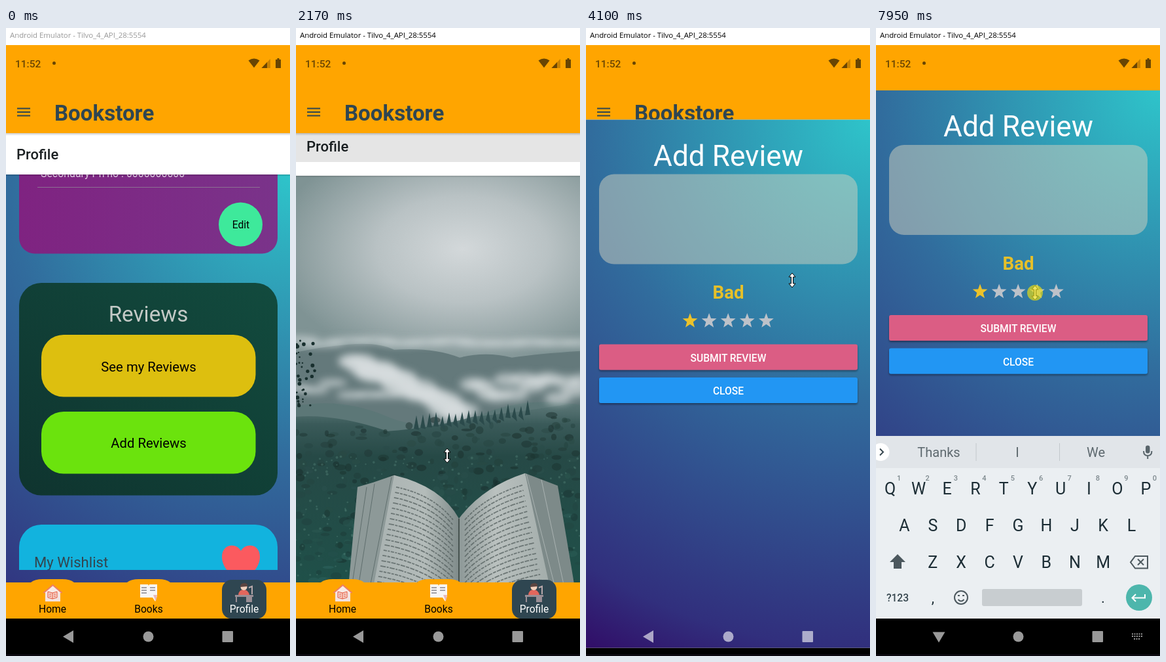
Recreate the animation shown at these times as an HTML page. Size 434 by 956 pixels, loop 8000 ms.

```html
<!DOCTYPE html>
<html lang="en">
<head>
<meta charset="utf-8">
<title>Bookstore app</title>
<style>
  html, body { margin: 0; height: 100%; overflow: hidden; background: #fff; }
  svg { display: block; width: 100vw; height: 100vh; font: 15.6px Roboto, sans-serif; }
  .mid { text-anchor: middle; }
  .med { font-weight: 500; }
  .bold { font-weight: 700; }
  .h2 { font-size: 22px; font-weight: 500; fill: #1b2022; }
  .line { fill: none; stroke-width: 2; }
</style>
</head>
<body>
<svg viewBox="0 0 434 956" preserveAspectRatio="none">
  <defs>
    <radialGradient id="sea" gradientUnits="userSpaceOnUse" cx="434" cy="0" r="914">
      <stop stop-color="#2ec4ca"/><stop offset=".47" stop-color="#316c9d"/>
      <stop offset=".88" stop-color="#312f7d"/><stop offset="1" stop-color="#310d67"/>
    </radialGradient>
    <radialGradient id="sky" gradientUnits="userSpaceOnUse" cx="255" cy="335" r="290" gradientTransform="matrix(1 0 0 .62 0 127)">
      <stop stop-color="#d3d8da"/><stop offset=".45" stop-color="#b9c2c4"/><stop offset="1" stop-color="#7f9394"/>
    </radialGradient>
    <linearGradient id="forest" x2="0" y2="1">
      <stop stop-color="#47656500"/><stop offset=".12" stop-color="#3a5a59"/><stop offset=".3" stop-color="#264946"/><stop offset="1" stop-color="#1f5049"/>
    </linearGradient>
    <linearGradient id="pageL"><stop stop-color="#a9b2b1"/><stop offset=".6" stop-color="#b4bcba"/><stop offset="1" stop-color="#7f8b8a"/></linearGradient>
    <linearGradient id="pageR"><stop stop-color="#8d9897"/><stop offset=".4" stop-color="#bac1bf"/><stop offset="1" stop-color="#a3adab"/></linearGradient>
    <linearGradient id="dusk" x1="0" y1="1" x2="1" y2="0"><stop stop-color="#0f342f"/><stop offset="1" stop-color="#124b3e"/></linearGradient>
    <linearGradient id="plum"><stop stop-color="#7f2381"/><stop offset="1" stop-color="#7a338a"/></linearGradient>
    <linearGradient id="shade" x2="0" y2="1"><stop stop-opacity=".2"/><stop offset="1" stop-opacity="0"/></linearGradient>
    <filter id="blur" x="-20%" y="-50%" width="140%" height="200%"><feGaussianBlur stdDeviation="6"/></filter>
    <filter id="drop" x="-5%" y="-20%" width="110%" height="160%"><feDropShadow dx="0" dy="2" stdDeviation="1.5" flood-opacity=".4"/></filter>
    <clipPath id="screen"><path d="M0 160H434V844H0z"/></clipPath>
    <clipPath id="scroll"><path d="M0 223H434V825H0z"/></clipPath>
    <clipPath id="reveal"><rect id="revealBox" width="434" height="684"/></clipPath>
    <clipPath id="photoBox"><path d="M0 223H434V844H0z"/></clipPath>
  </defs>

  <rect width="434" height="956" fill="#fff"/>
  <text id="caption" x="6" y="15" font-size="11.5" style="font-family:'Open Sans',sans-serif" letter-spacing="-.1">Android Emulator - Tilvo_4_API_28:5554</text>

  <g clip-path="url(#screen)">
    <!-- profile page -->
    <g id="profile">
      <rect y="160" width="434" height="700" fill="#fff"/>
      <text class="h2" x="16" y="200">Profile</text>
      <rect width="434" height="640" fill="url(#sea)" transform="translate(0 223)"/>
      <g clip-path="url(#scroll)">
        <rect x="20" y="150" width="395" height="193.500" rx="24" fill="url(#plum)"/>
        <text x="53" y="227" font-size="15.9" fill="#e6d3e8">Secondary Ph no : 0000000000</text>
        <path d="M48 242.500H388" stroke="#8c6f92"/>
        <circle cx="358.500" cy="299" r="33.500" fill="#3ee99b"/>
        <text class="mid" x="359" y="305">Edit</text>
        <rect x="20" y="388" width="395" height="323.500" rx="34" fill="url(#dusk)"/>
        <text class="mid" x="217.500" y="446.500" font-size="33.200" fill="#c3c9c6">Reviews</text>
        <rect x="54" y="467" width="327.500" height="94.500" rx="34" fill="#ddbf0f"/>
        <rect x="54" y="584" width="327.500" height="94.500" rx="34" fill="#6be30d"/>
        <g class="mid" font-size="20.300">
          <text x="218" y="523">See my Reviews</text><text x="218" y="639">Add Reviews</text>
        </g>
        <rect x="20" y="756" width="395" height="150" rx="34" fill="#12b3de"/>
        <text x="43" y="821" font-size="22.100" fill="#33454f">My Wishlist</text>
        <path d="M359 846C345 834 330 822 330 805C330 785 352 783 359 796C366 783 388 785 388 805C388 822 373 834 359 846z" fill="#fb5a5f"/>
      </g>
      <rect y="223" width="434" height="3" fill="url(#shade)"/>
    </g>
    <rect id="dim" y="160" width="434" height="684"/>

    <!-- add-review page -->
    <g clip-path="url(#reveal)"><g id="addPage">
      <rect y="160" width="434" height="64" fill="#fff"/>
      <path class="line" stroke="#1b2022" d="M36 191.500H20M27.500 183.500L19.500 191.500L27.500 199.500"/>
      <text class="h2" x="74" y="200">Add Review</text>
      <g clip-path="url(#photoBox)">
        <rect y="223" width="434" height="400" fill="url(#sky)"/>
        <path d="M0 492Q35 484 80 480T150 488Q210 484 250 500Q290 490 330 500Q370 494 434 490V640H0z" fill="#64797b"/>
        <path d="M0 574Q70 560 140 590T300 580Q360 560 434 572V660H0z" fill="#5c7777"/>
        <g id="fog" fill="#d8dedf" filter="url(#blur)"></g>
        <path d="M0 590Q60 585 140 612Q215 606 270 590Q330 585 434 568V844H0z" fill="url(#forest)"/>
        <g id="trees"></g>
        <path d="M94 697L118 690L150 679L249 745L240 850H80z" fill="#8d9998"/>
        <path d="M120 692L96 844M108 697L86 844M146 682L114 844" stroke="#5f6e6d" fill="none"/>
        <path d="M150 679Q222 696 249 745V850H118z" fill="url(#pageL)"/>
        <path d="M350 676L400 695L426 850H370z" fill="#7d8a89"/>
        <path d="M352 677L396 850M375 686L410 850" stroke="#a9b2b1" fill="none"/>
        <path d="M249 745Q285 697 350 676L388 850H249z" fill="url(#pageR)"/>
        <path d="M249 745V844" stroke="#46524f" stroke-width="2"/>
        <g id="print" fill="none" stroke="#566160" stroke-width="1.800" opacity=".75"></g>
      </g>
      <g id="card">
        <rect x="20" y="245" width="395" height="179" rx="23" fill="#14705f" fill-opacity=".93" filter="url(#drop)"/>
        <rect x="43" y="267" width="78" height="135" fill="#3f4c5d"/>
        <path d="M43 360L85 357L121 364V402H43z" fill="#a9c0ca"/>
        <path d="M43 358Q85 347 121 352V364Q85 358 43 368z" fill="#8fa5b0"/>
        <circle cx="96" cy="285.500" r="4.500" fill="#dfe3e6"/>
        <path d="M43 330Q62 340 55 372M55 345Q75 333 84 334M121 318Q104 326 108 360M108 336Q96 326 84 328M43 276Q75 268 90 275M43 287Q60 276 76 284" stroke="#67606d" stroke-width="3" fill="none"/>
        <path d="M52 316l5-11 4 11 5-10 3 10q8-16 8 0l6-11 3 11 6-12M95 316v-13l5 12 4-13 5 10" stroke="#eef0f2" stroke-width="2" fill="none"/>
        <path d="M66 298H100" stroke="#cdd3d8" stroke-dasharray="3 1.500"/>
        <path d="M53 386l4-11 5 11zM63 387l3-11 5 11zM76 386l4-10 4 10z" fill="#4b4a55"/>
        <g font-size="15.700" fill="#fff">
          <text x="159.500" y="285">Book name : Moyurider Nodi</text>
          <text x="159.500" y="306.500">Author name :</text>
          <text x="159.500" y="328">Review Already given : Yes</text>
        </g>
        <g id="addButton">
          <rect x="275" y="355" width="106" height="46" rx="23" fill="#6f9640" stroke="#a3523f"/>
          <text class="mid" x="328" y="384" fill="#435f25">Add Review</text>
        </g>
      </g>
      <rect y="223" width="434" height="3" fill="url(#shade)"/>
    </g></g>
    <rect y="160" width="434" height="4" fill="url(#shade)"/>
  </g>

  <!-- app bar -->
  <rect y="26" width="434" height="134" fill="#ffa500"/>
  <g fill="#684503">
    <text class="med" x="14" y="60" font-size="15.500">11:52</text>
    <circle cx="73.500" cy="53.500" r="2.500"/>
    <path d="M379 60.500L370.500 49.500Q379 43.500 387.500 49.500z"/>
    <path d="M390.500 61L404 47V61z" opacity=".35"/><path d="M390.500 61L399 52V61z"/>
    <path d="M412 48h2.500v-2h3v2h2.500v13h-8z"/>
  </g>
  <path class="line" stroke="#2f4651" d="M17 122.500H37M17 128H37M17 133.500H37"/>
  <text class="bold" x="74" y="141" font-size="33.100" fill="#2f4651">Bookstore</text>

  <!-- tabs -->
  <path d="M0 844H38Q44 839 56 839H86Q98 839 104 844H185Q191 839 203 839H233Q245 839 251 844H434V899H0z" fill="#ffa500"/>
  <rect x="330" y="840" width="68" height="59.500" rx="15" fill="#2f4651"/>
  <path d="M60 859H83V873H60z" fill="#f3e3e0"/>
  <path d="M57.500 860L71.500 848L85.500 860" fill="#f7ebe6" stroke="#ee7d63" stroke-width="2"/>
  <path d="M64 858l7 2 7-2v9l-7 2-7-2z" fill="#f6d2c8" stroke="#e4573d"/><path d="M71 860v9M66 862h3M66 865h3M73 862h3M73 865h3" stroke="#e4573d"/>
  <path d="M205 847h12l1 2 1-2h12v18l-3 8-4-6h-19z" fill="#f7f5f6"/>
  <path d="M207 852h8M207 856h8M207 860h8M220 852h8M220 856h8" stroke="#4f4c55"/>
  <path d="M225 863h6l-2 10z" fill="#eab9b6"/>
  <path d="M355 863q1-8 8-8t9 8z" fill="#e2665c"/><circle cx="363.500" cy="851" r="5" fill="#f3d1bd"/>
  <path d="M358 851q0-6 6-6t5 5z" fill="#5b4440"/>
  <path d="M350 863h28v3h-2v8h-9v-8h-14v8h-2v-8h-1z" fill="#9a8e95"/><path class="line" d="M371 852l5-2v12" stroke="#b9a9ac"/>
  <g class="mid">
    <text x="71" y="890">Home</text><text x="218" y="890">Books</text><text x="364" y="890" fill="#fff">Profile</text>
  </g>
  <rect y="899" width="434" height="54" fill="#000"/>

  <!-- review dialog -->
  <g id="dialog">
    <rect width="434" height="804" fill="#fff"/>
    <rect id="dialogBack" width="434" height="804" fill="url(#sea)"/>
    <text class="mid" x="217.500" y="70" font-size="44.200" fill="#fff">Add Review</text>
    <rect x="20" y="83" width="395" height="137" rx="23" fill="#d4d2bf" fill-opacity=".5"/>
    <rect id="caret" x="31.500" y="140" width="2" height="23" fill="#0fd0b8"/>
    <text class="mid bold" x="217.500" y="272.500" font-size="27.600" fill="#e6c029">Bad</text>
    <g id="stars"></g>
    <g filter="url(#drop)">
      <rect x="20" y="342" width="395" height="39" rx="3" fill="#db5d84"/>
      <rect x="20" y="392.500" width="395" height="39" rx="3" fill="#2196f3"/>
    </g>
    <g class="mid med" fill="#fff">
      <text x="217.500" y="368">SUBMIT REVIEW</text><text x="217.500" y="418.500">CLOSE</text>
    </g>
  </g>

  <!-- keyboard -->
  <g id="keyboard">
    <rect y="621" width="434" height="278" fill="#ebeff2"/>
    <rect y="621" width="434" height="49" fill="#e1e5e9"/>
    <circle cx="7" cy="645.500" r="13.500" fill="#fff"/>
    <path class="line" stroke="#37474f" d="M6 640.500l5 5-5 5"/>
    <path stroke="#c3c8cc" d="M153 632V659M280.500 632V659"/>
    <g class="mid" font-size="20" fill="#5d686e"><text x="96" y="653">Thanks</text><text x="216" y="653">I</text><text x="336" y="653">We</text></g>
    <rect x="412" y="635.500" width="6.500" height="12" rx="3.200" fill="#59656b"/>
    <path class="line" stroke="#59656b" d="M409 644q0 7 6.200 7t6.200-7M415.200 651v5"/>
    <g id="keys" class="mid" font-size="25" fill="#1c2d35"></g>
    <path d="M33 801l12 12h-6v10h-12v-10h-6z" fill="#4c585e"/>
    <path class="line" stroke="#4c585e" d="M396 804h19v18.500h-19l-7-9.200zM400 808.500l9 9M409 808.500l-9 9"/>
    <text class="mid med" x="33" y="873" fill="#37474f">?123</text>
    <g class="mid" font-size="22" fill="#1c2d35"><text x="87" y="875">,</text><text x="347" y="875">.</text></g>
    <circle class="line" cx="130" cy="867" r="10" stroke="#4c585e"/>
    <path class="line" stroke="#4c585e" d="M125.500 870q4.500 5 9 0M125 864h3M132 864h3"/>
    <rect x="162" y="854" width="153" height="26" rx="3" fill="#c8cdd0"/>
    <circle cx="402" cy="867" r="20" fill="#4db6ac"/>
    <path class="line" stroke="#fff" d="M411 862v5.500h-19M397 862l-5.500 5.500 5.500 5.500"/>
  </g>

  <!-- system buttons -->
  <g fill="#fff" opacity=".6">
    <path id="back" d="M87 926.500L103 917V936z"/>
    <circle cx="217.500" cy="926.500" r="8"/>
    <rect x="330.500" y="918" width="16.500" height="17" rx="1"/>
    <path id="imeIcon" d="M391 922.500H407M391 926H407M394 930H404" stroke="#fff" stroke-width="2" stroke-dasharray="2 1.500"/>
  </g>
  <rect y="953" width="434" height="3" fill="#0c0910"/>

  <g id="cursor">
    <path d="M0-11L5-5H1.500V5H5L0 11L-5 5H-1.500V-5H-5z" fill="#fff" stroke="#000"/>
    <circle id="press" r="12" fill="#e8dc12" fill-opacity=".68"/>
  </g>
</svg>
<script>
const $ = id => document.getElementById(id);
const set = (id, name, value) => $(id).setAttribute(name, value);
const show = (id, on) => set(id, 'visibility', on ? 'visible' : 'hidden');
const span = (t, start, length) => Math.min(1, Math.max(0, (t - start) / length));
const between = (t, a, b) => t >= a && t < b;
const repeat = (n, make) => Array.from({ length: n }, (_, i) => make(i)).join('');

let seed = 7;
const rand = () => (seed = seed * 16807 % 2147483647) / 2147483647;

// Fog: a thin band along the ridge, a bank sinking to the right, and one on the right slope.
const puff = (x, y, rx, ry) => `<ellipse cx="${x}" cy="${y}" rx="${rx}" ry="${ry}" opacity=".65"/>`;
$('fog').innerHTML = repeat(12, i => puff(i * 40, 472 + rand() * 8, 34, 5))
  + repeat(22, i => puff(85 + i * 8, 492 + i * 4 + rand() * 16, 16 + rand() * 18, 8 + rand() * 10))
  + repeat(14, i => puff(270 + i * 13, 530 + rand() * 32, 20, 10))
  + repeat(7, i => puff(i * 28, 535 + rand() * 24, 22, 6));

// Foliage: dark crowns on the slope, lighter leaves in front, a few firs and a twig.
$('trees').innerHTML = repeat(420, i => {
  const depth = i / 420, x = rand() * 434, y = 606 + depth * 240 + rand() * 12 - (1 - depth) * x * .06;
  return `<ellipse cx="${x}" cy="${y}" rx="${3 + rand() * 6}" ry="${2 + rand() * 4}"
    fill="hsl(${170 + rand() * 6} ${26 + depth * 14}% ${14 + rand() * (9 + depth * 8)}%)" opacity=".55"/>`;
}) + repeat(300, () => `<circle cx="${rand() * 434}" cy="${650 + rand() * 194}" r="${1 + rand()}" fill="#5d8d82" opacity=".35"/>`)
  + repeat(18, i => `<path d="M${180 + i * 10} ${608 - i * 1.2}l4-${14 + rand() * 9} 4 22z" fill="#2b4a4b"/>`)
  + repeat(34, () => `<circle cx="${rand() ** 2 * 32}" cy="${472 + rand() * 104}" r="${1 + rand() * 2}" fill="#182f2e"/>`);

// Lines of print, following the curve of each page.
$('print').innerHTML = repeat(19, i => {
  const y = 697 + i * 8, dash = `stroke-dasharray="${5 + i % 4} 1.500 ${3 + i % 3} 1.500"`, slant = i * 1.6;
  return `<path ${dash} d="M${153 - slant} ${y}Q${210 - slant / 2} ${y + 12} 240 ${y + 50}"/>
    <path ${dash} d="M258 ${y + 50}Q290 ${y + 14} ${346 + slant} ${y - 3}"/>`;
});

$('stars').innerHTML = repeat(5, i => {
  const points = repeat(10, k => {
    const r = k % 2 ? 5 : 12, a = k * Math.PI / 5;
    return `${159 + i * 29.1 + r * Math.sin(a)},${306.5 - r * Math.cos(a)} `;
  });
  return `<polygon points="${points}" fill="${i ? '#bdc2c9' : '#ecc22a'}"/>`;
});

$('keys').innerHTML = ['QWERTYUIOP', 'ASDFGHJKL', 'ZXCVBNM'].map((row, r) =>
  repeat(row.length, i => {
    const x = [21.7, 43.4, 86.8][r] + i * 43.4;
    const digit = r ? '' : `<text class="med" x="${x + 13.5}" y="689" font-size="11" fill="#7d888d">${(i + 1) % 10}</text>`;
    return `<text x="${x}" y="${710 + r * 56}">${row[i]}</text>${digit}`;
  })).join('');

// Pointer stops: time, x, y.
const path = [
  [330, 372, 879], [620, 288, 668], [850, 206, 597], [1100, 231, 651], [2380, 231, 651], [2740, 257, 494],
  [3150, 349, 379], [3480, 315, 384], [4430, 315, 384], [5200, 117, 247], [5900, 117, 247], [6120, 138, 231],
  [6420, 190, 183], [6900, 259, 416], [7300, 259, 417], [7680, 243, 403], [8000, 243, 403]
];
const clicks = [[1430, 1700], [3550, 3760], [5260, 5400], [7880, 8000]];

function pointerAt(t) {
  const i = Math.max(1, path.findIndex(stop => t < stop[0]));
  const [t0, x0, y0] = path[i - 1], [t1, x1, y1] = path[i];
  const k = span(t, t0, t1 - t0), e = k * k * (3 - 2 * k);
  return [x0 + (x1 - x0) * e, y0 + (y1 - y0) * e];
}

function draw() {
  const t = performance.now() % 8000;

  set('caption', 'fill', t < 1430 ? '#999' : '#000');

  const open = 1 - (1 - span(t, 1960, 425)) ** 4;
  set('profile', 'transform', `translate(0 ${-12.8 * open})`);
  set('dim', 'opacity', .11 * open);
  set('revealBox', 'y', 160 + 684 * (1 - open));
  set('addPage', 'transform', `translate(0 ${28 * (1 - open)})`);
  show('card', t >= 2450);
  set('addButton', 'opacity', 1 - .2 * span(t, 3620, 120));

  const rise = (1 - span(t, 3938, 211)) ** 2;
  set('dialog', 'transform', `translate(0 ${95 + 861 * rise})`);
  set('dialogBack', 'height', t < 5480 ? 804 : 526);
  show('caret', t >= 5400 && (t - 5400) % 1000 < 500);

  const typing = t >= 5440;
  set('keyboard', 'opacity', span(t, 5440, 150));
  set('keyboard', 'transform', `translate(0 ${132 * (1 - span(t, 5440, 250)) ** 2})`);
  set('back', 'transform', typing ? 'rotate(-90 96 926.5)' : '');
  show('imeIcon', typing);

  show('cursor', t >= 330);
  set('cursor', 'transform', `translate(${pointerAt(t)})`);
  set('press', 'opacity', clicks.some(([a, b]) => between(t, a, b)) ? 1 : 0);

  requestAnimationFrame(draw);
}
draw();
</script>
</body>
</html>
```
